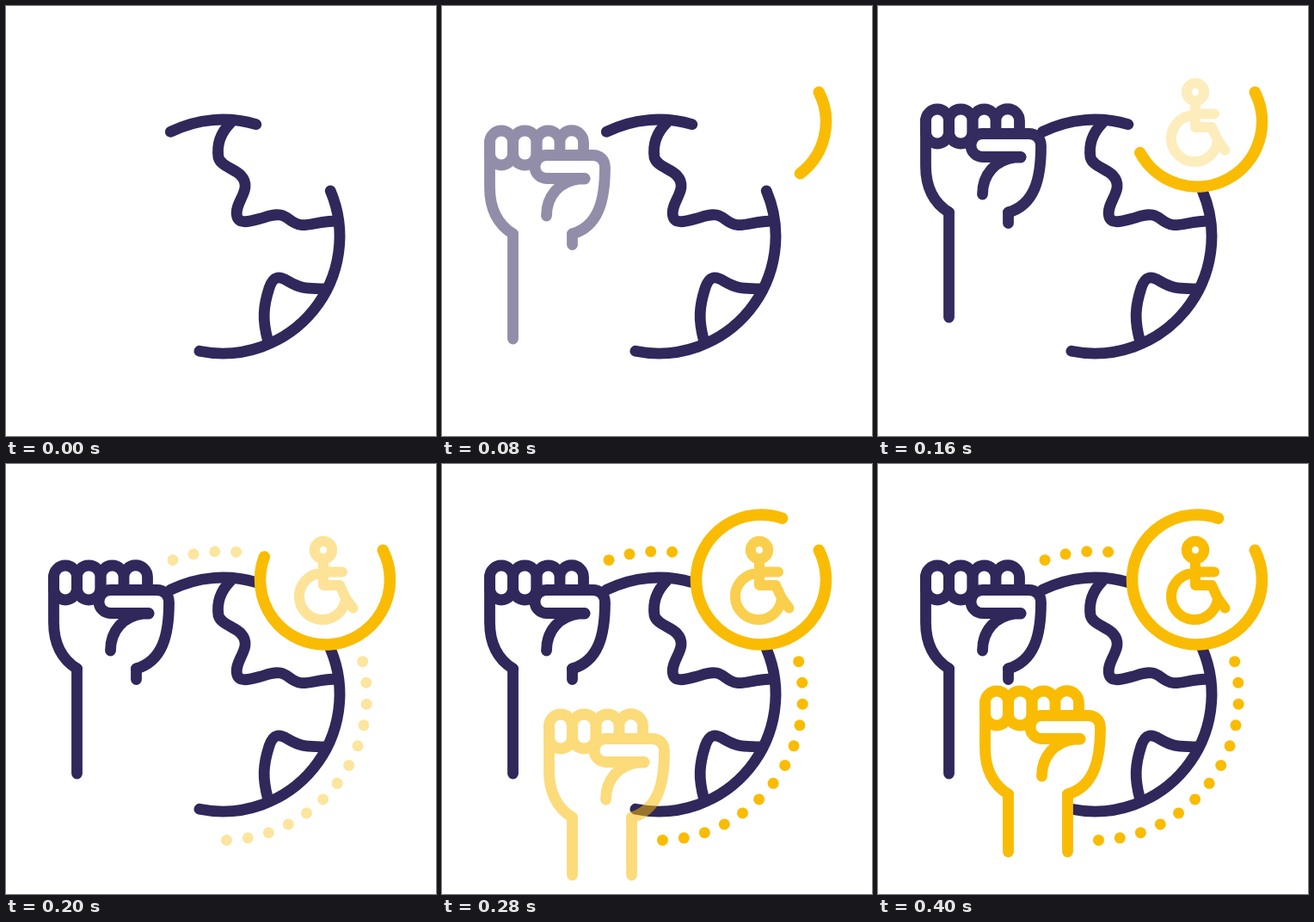
Write an HTML page that moves like this. It is 500 by 500 pixels and loops after 3 s.

```html
<!DOCTYPE html>
<html lang="en">
<head>
<meta charset="utf-8">
<title>Raised fists and globe</title>
<style>
  html, body { margin: 0; width: 100%; height: 100%; overflow: hidden; background: #fff; }
  svg { display: block; width: 100vw; height: 100vh; }
  .line { fill: none; stroke-width: 12.8; stroke-linecap: round; stroke-linejoin: round; }
  .navy { stroke: #30275b; }
  .gold { stroke: #f9bc02; }
  #ring { stroke-width: 13.5; }
  #wheelchair { stroke-width: 12; }
  #dots { fill: #f9bc02; }
</style>
</head>
<body>
<svg viewBox="0 0 500 500">
  <defs>
    <g id="hand">
      <rect x="55.5" y="118" width="27" height="40" rx="13.5"/>
      <rect x="82.5" y="118" width="27.5" height="40" rx="13.5"/>
      <path d="M110 146V131.500a13.500 13.500 0 0 1 27 0V146M137 131.500a13.500 13.500 0 0 1 27.500 0V145"/>
      <path d="M166 173.500H121.500a13.500 13.500 0 0 1 0-27H175C184 146.500 189.500 152 189.500 161C189.500 199 182 229 151.500 238"/>
      <path d="M166 174H160C136 177 121.500 194 121.500 217"/>
      <path d="M55.500 131V184C55.500 210 65 227 82.500 238"/>
    </g>
  </defs>
  <g class="line navy">
    <path id="globe"/>
    <path d="M261 136C248 149 245 162 247 176C250 187 266 189 273 197C288 213 265 228 268.500 244C271 256 288 249 300 246C328 236 326 252 343 254.500C352 256 365 250 385 250"/>
    <path d="M304.500 389C298 365 299 350 306 328C311 313 318 314 328 320C345 330 352 328 370 329"/>
  </g>
  <g id="navyFist" class="line navy">
    <use href="#hand"/>
    <path d="M82.500 238V360M151.500 238V250.500"/>
  </g>
  <g id="dots"></g>
  <path id="ring" class="line gold"/>
  <g id="wheelchair" class="line gold">
    <circle cx="369" cy="100" r="10.2"/>
    <path d="M369 113V141H388L395 156L403.500 167.500M369 125.500H391M362 127.700A27 27 0 1 0 394.500 159"/>
  </g>
  <g id="goldFist" class="line gold">
    <use href="#hand"/>
    <path d="M82.500 238V305M151.500 238V305"/>
  </g>
</svg>
<script>
const LOOP = 3000, STEP = 40;
const $ = id => document.getElementById(id);
const clamp = v => Math.max(0, Math.min(1, v));

function polar(cx, cy, r, deg) {
  const a = deg * Math.PI / 180;
  return [cx + r * Math.cos(a), cy + r * Math.sin(a)].map(v => v.toFixed(2));
}

function arc(cx, cy, r, from, to) {
  return `M${polar(cx, cy, r, from)}A${r} ${r} 0 ${to - from > 180 ? 1 : 0} 1 ${polar(cx, cy, r, to)}`;
}

$('globe').setAttribute('d', arc(252, 268, 136, -116.5, -73.4) + arc(252, 268, 136, -23, 101.5));

function addDots(from, count) {
  for (let i = 0; i < count; i++) {
    const dot = document.createElementNS('http://www.w3.org/2000/svg', 'circle');
    const [x, y] = polar(251.5, 269.5, 168, from + 8.5 * i);
    dot.setAttribute('cx', x);
    dot.setAttribute('cy', y);
    dot.setAttribute('r', 6.5);
    $('dots').append(dot);
  }
}
addDots(-110, 4);
addDots(-13.7, 13);

// Drop below the resting place and opacity, one pair per step
const RISE = [[34.5, 0.22], [27, 0.52], [8.3, 0.9], [2, 0.98], [0, 1]];

function poseFist(id, x, y, t) {
  const step = Math.floor(t / STEP);
  const [drop, opacity] = step < 0 ? [0, 0] : RISE[Math.min(step, RISE.length - 1)];
  $(id).setAttribute('transform', `translate(${x} ${y + drop})`);
  $(id).setAttribute('opacity', opacity);
}

function render(time) {
  const t = Math.floor((time % LOOP) / STEP) * STEP;
  poseFist('navyFist', 0, 0, t - 40);
  poseFist('goldFist', 69, 146, t - 240);

  const sweep = Math.min(316, 80 + (t - 80) * 1.23);
  $('ring').setAttribute('d', t < 40 ? '' : arc(371, 134.5, 75.5, -27, -27 + sweep));
  $('wheelchair').setAttribute('opacity', clamp((t - 90) / 270));
  $('dots').setAttribute('opacity', clamp((t - 160) / 105));
}

const start = performance.now();
function tick() {
  render(performance.now() - start);
  requestAnimationFrame(tick);
}
tick();
</script>
</body>
</html>
```
